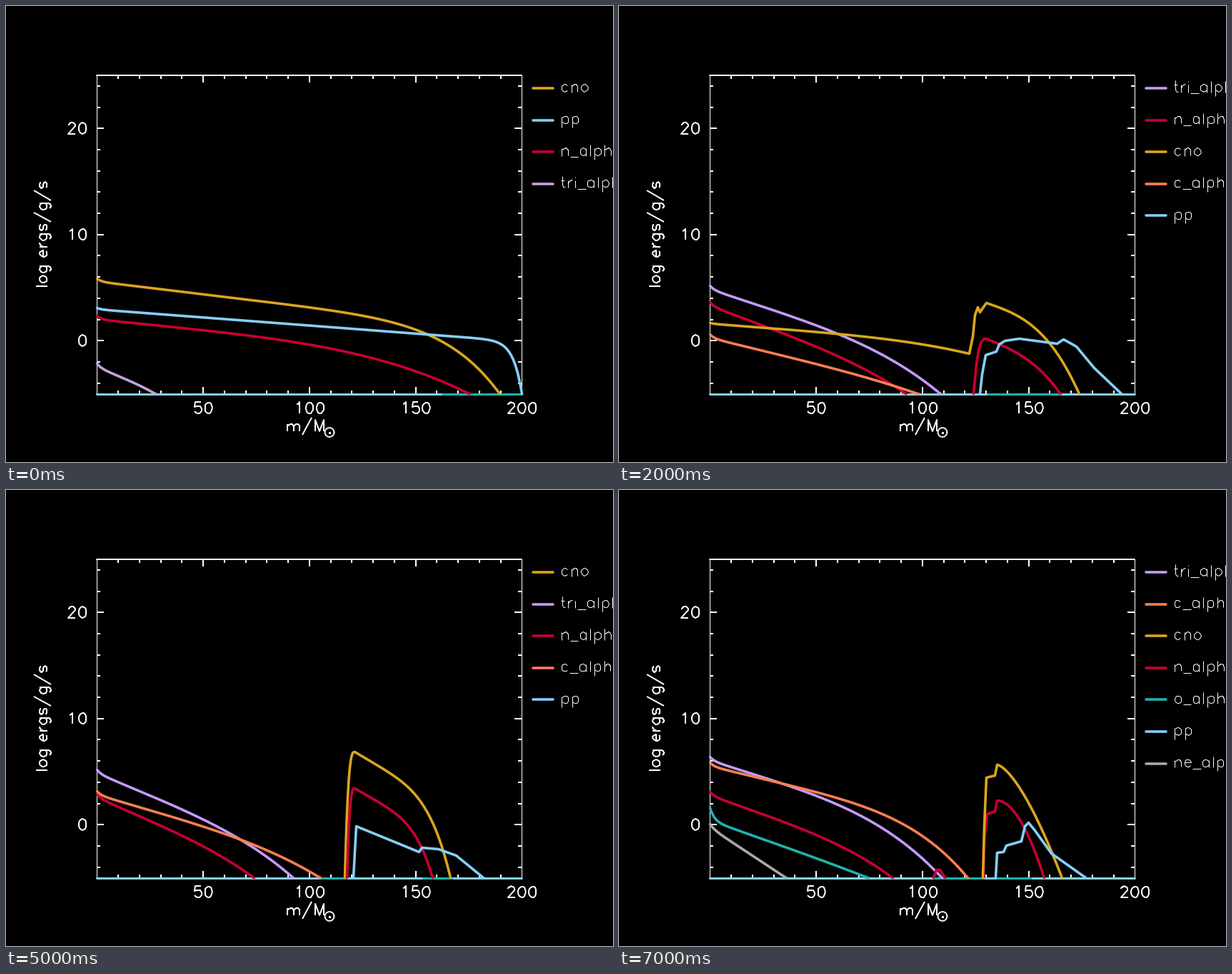
Write a matplotlib script that moves like this. It is 850 by 638 pixels and loops after 8000 ms.

```python
import numpy as np
import matplotlib.pyplot as plt
from matplotlib.animation import ArtistAnimation
from matplotlib.collections import LineCollection

W, H, DPI = 850, 638, 100
PX = 72 / DPI
LEFT, RIGHT, TOP, FLOOR = 127.5, 722.5, 97, 542.5
UNIT = 0.74  # pixels per glyph unit

COLORS = dict(cno="#DAA520", pp="#87CEFA", n="#C80032", tri="#C49AFF",
              c="#FF7F50", ne="#A9A9A9", o="#20B2AA")
LABELS = dict(cno="cno", pp="pp", n="n_alpha", tri="tri_alpha",
              c="c_alpha", ne="ne_alpha", o="o_alpha")

plt.rcParams["toolbar"] = "None"
fig = plt.figure(figsize=(W / DPI, H / DPI), dpi=DPI, facecolor="black")
ax = fig.add_axes([0, 0, 1, 1])
ax.set(xlim=(0, W), ylim=(H, 0))
ax.axis("off")


# --- stroke lettering, y up from the baseline ---

def arc(cx, cy, rx, ry, a0, a1):
    a = np.radians(np.linspace(a0, a1, 16))
    return list(zip(cx + rx * np.cos(a), cy + ry * np.sin(a)))


def stem(x, top, bottom=0):
    return [(x, top), (x, bottom)]


def arch(x):
    return [(x, 10)] + arc(x + 6.5, 9, 4.5, 5, 150, 0) + [(x + 11, 0)]


BOWL = arc(9, 7, 6, 7, 40, 320)

GLYPHS = {  # character: (advance, strokes)
    " ": (11, []),
    "_": (16, [[(0, -2), (16, -2)]]),
    "/": (22, [[(20, 25), (2, -7)]]),
    "a": (19, [[(15, 10)] + BOWL + [(15, 3)], stem(15, 14)]),
    "c": (18, [BOWL]),
    "e": (18, [[(3, 8), (15, 8)] + arc(9, 7, 6, 7, 10, 320)]),
    "g": (19, [[(15, 10)] + BOWL + [(15, 3)],
               stem(15, 14) + arc(10, -2, 5, 5, 0, -145)]),
    "h": (19, [stem(4, 21), arch(4)]),
    "i": (8, [stem(4, 14), stem(4, 21, 20)]),
    "l": (8, [stem(4, 21)]),
    "m": (30, [stem(4, 14), arch(4), arch(15)]),
    "n": (19, [stem(4, 14), arch(4)]),
    "o": (19, [arc(9.5, 7, 6.5, 7, 0, 360)]),
    "p": (19, [stem(4, 14, -7), arc(10, 7, 6, 7, 145, -145)]),
    "r": (13, [stem(4, 14), arc(12, 6, 8, 8, 165, 90)]),
    "s": (17, [arc(8.5, 10.5, 5.5, 3.5, 20, 270)
               + arc(8.5, 3.5, 5.5, 3.5, 90, -160)]),
    "t": (12, [[(5, 21), (5, 4), (6, 1), (8, 0), (10, 0)], [(2, 14), (9, 14)]]),
    "M": (24, [[(4, 0), (4, 21), (12, 0), (20, 21), (20, 0)]]),
    "0": (20, [arc(10, 10.5, 7, 10.5, 0, 360)]),
    "1": (20, [[(6, 17), (8, 18), (11, 21), (11, 0)]]),
    "2": (20, [arc(10, 15.5, 6, 5.5, 175, -25) + [(3, 0), (17, 0)]]),
    "5": (20, [[(15, 21), (5, 21), (4, 12)] + arc(10, 7, 7, 7, 110, -155)]),
}


def text_width(s):
    return UNIT * sum(GLYPHS[ch][0] for ch in s)


def write(s, x, y, width, upward=False):
    """Draw strokes on the pixel grid, so that stems stay crisp."""
    strokes, pen = [], 0
    for ch in s:
        advance, parts = GLYPHS[ch]
        for part in parts:
            p = np.array(part, float)
            u, v = UNIT * (p[:, 0] + pen), UNIT * p[:, 1]
            spot = np.c_[x - v, y - u] if upward else np.c_[x + u, y - v]
            strokes.append(np.round(spot) + width % 2 / 2)
        pen += advance
    return ax.add_collection(LineCollection(
        strokes, colors="white", linewidths=width * PX))


def line(xs, ys, color, width, z=2, cap="round"):
    return ax.plot(xs, ys, color=color, lw=width * PX, zorder=z,
                   solid_capstyle=cap, solid_joinstyle="round")[0]


# --- fixed axes ---

def x_at(mass):
    return LEFT + mass * (RIGHT - LEFT) / 200


def y_at(value):
    return TOP + (25 - value) * (FLOOR - TOP) / 30


def tick(xs, ys):
    line(xs, ys, "white", 2, 1, "butt")


def draw_axes():
    for x in (LEFT, RIGHT):
        line([x, x], [TOP, FLOOR], "white", 1, 1)
    for y in (TOP, FLOOR):
        line([LEFT, RIGHT], [y, y], "white", 2, 1)
    for m in range(10, 200, 10):
        x, size = x_at(m), 10 if m % 50 == 0 else 5
        tick([x, x], [TOP, TOP + size])
        tick([x, x], [FLOOR, FLOOR - size])
    for v in range(-4, 25, 2):
        y, size = y_at(v), 10 if v % 10 == 0 else 5
        tick([LEFT, LEFT + size], [y, y])
        tick([RIGHT, RIGHT - size], [y, y])
    for m in (50, 100, 150, 200):
        write(str(m), x_at(m) - text_width(str(m)) / 2, 570, 2)
    for v in (0, 10, 20):
        write(str(v), 114.5 - text_width(str(v)), y_at(v) + 7.5, 2)
    write("m/M", 391.5, 595, 2)
    sun = np.array(arc(453, 596.5, 6.5, 6.5, 0, 360))
    line(sun[:, 0], sun[:, 1], "white", 1.8)
    ax.plot([453], [596.5], "o", color="white", ms=3.4 * PX, mew=0)
    s = "log ergs/g/s"
    write(s, 57.5, 319.7 + text_width(s) / 2, 2, upward=True)


# --- curve pieces, in stage pixels ---

def fall(x0, y0, x1, bend, power=3, cusp=0, y1=FLOOR):
    """Drop from start to end: quick cusp, steady slope, bend at the end."""
    x = np.linspace(x0, x1, 200)
    u = (x - x0) / (x1 - x0)
    dip = cusp * (1 - np.exp(-(x - x0) / 6))
    slope = (1 - bend) * u + bend * u ** power
    return np.c_[x, y0 + dip + (y1 - y0 - cusp) * slope]


def rise(x0, x1, y1, power=3):
    """Leave the floor steeply and level off at the peak."""
    u = np.linspace(0, 1, 60)
    return np.c_[x0 + (x1 - x0) * u, y1 + (FLOOR - y1) * (1 - u) ** power]


scenes = []


class Scene:
    """One still: legend in the given order, floor line and curves."""

    def __init__(self, order, *teal, **tint):
        self.colors = {**COLORS, **tint}
        self.art = [line([LEFT, RIGHT], [FLOOR, FLOOR], COLORS["pp"], 3)]
        self.art += [line(span, [FLOOR, FLOOR], COLORS["o"], 3, cap="butt")
                     for span in teal]
        for i, key in enumerate(order.split()):
            y = 115 + 44.6 * i
            self.art.append(line([738, 766], [y, y], self.colors[key], 3.6))
            self.art.append(write(LABELS[key], 775.5, y + 4.6, 1))
        scenes.append(self.art)

    def curve(self, key, *pieces):
        x, y = np.vstack(pieces).T
        z = 4 if key == "pp" else 3
        self.art.append(line(x + 0.5, np.minimum(y + 0.5, FLOOR),
                             self.colors[key], 3.6, z))

    def core(self, key, y0, x1, bend, power=4, cusp=5):
        self.curve(key, fall(127, y0, x1, bend, power, cusp))

    def shell(self, key, x0, peak, x1, bend, power=3):
        self.curve(key, rise(x0, *peak), fall(*peak, x1, bend, power))


draw_axes()

s = Scene("cno pp n tri", (610, 722), tri="#C8A2DC")
s.core("tri", 500, 209, 0.1)
s.core("n", 433, 649, 0.5)
s.core("cno", 381, 691, 0.57, 8, 4)
s.core("pp", 422, 722, 0.62, 50, 2)

s = Scene("cno n pp tri", (600, 715))
s.core("tri", 470, 296, 0.1)
s.core("n", 413, 640, 0.45)
s.core("cno", 372, 682, 0.57, 8, 4)
s.core("pp", 430, 716, 0.62, 30, 2)

s = Scene("tri n cno c pp", (515, 618))
s.core("tri", 391, 450, 0.28)
s.core("n", 414, 402, 0.17)
s.core("c", 459, 419, 0.1)
s.shell("n", 496, (514, 465), 618, 0.45)
s.curve("cno", fall(127, 443, 490, 0.35, 4, 1, 486),
        [(495, 462), (498, 432), (502, 421), (505, 428)],
        fall(514, 415, 644, 0.65))
s.curve("pp", [(505, 542), (508, 515), (513, 488), (528, 483), (532, 473)],
        [(540, 468), (560, 465), (613, 472), (622, 466), (640, 476)],
        [(665, 506), (703, 542)])

s = Scene("cno tri n c pp ne o", (590, 632))
s.core("ne", 500, 185, 0.1)
s.core("o", 511, 196, 0.1)
s.core("tri", 377, 474, 0.35)
s.curve("cno", rise(192, 350, 504, 2.5),
        [(428, 508), (445, 504), (490, 508), (493, 480), (496, 476)],
        [(500, 445), (503, 405), (505, 331), (507, 333), (508, 349)],
        fall(508, 349, 569, 0.2, y1=376), fall(570, 435, 644, 0.55))
s.core("n", 404, 425, 0.25)
s.curve("n", [(503, 542), (505, 395)], fall(507, 403, 569, 0.2, y1=432),
        fall(570, 487, 621, 0.45))
s.core("c", 411, 508, 0.33)
s.curve("pp", [(505, 542), (506, 475), (507, 460), (568, 479), (570, 465)],
        [(605, 468), (627, 479), (637, 471), (655, 495), (701, 542)])

s = Scene("cno n tri c pp", (395, 440), (583, 640))
s.core("tri", 411, 390, 0.14)
s.core("n", 427, 350, 0.12)
s.core("c", 438, 440, 0.16)
s.curve("cno", [(417, 537), (418, 542)])
s.curve("cno", [(432, 541), (441, 512), (452, 504), (457, 487), (465, 482)],
        [(468, 464), (479, 449), (483, 420), (485, 380)],
        fall(488, 355, 606, 0.65, 12, y1=498), [(614, 507), (632, 542)])
s.shell("n", 477, (487, 406), 606, 0.65, 10)
s.curve("pp", [(487, 542), (488, 466), (579, 493), (581, 480), (587, 484)],
        [(592, 481), (608, 485), (625, 494), (638, 491), (660, 511)],
        [(694, 542)])

s = Scene("cno tri n c pp", (440, 478), (583, 625))
s.core("tri", 391, 402, 0.22)
s.core("n", 425, 347, 0.15)
s.core("c", 421, 440, 0.22)
s.shell("cno", 474, (488, 366), 622, 0.55, 5)
s.shell("n", 477, (488, 417), 597, 0.5, 5)
s.curve("pp", [(486, 542), (490, 470), (578, 506), (582, 500), (605, 502)],
        [(630, 511), (668, 542)])

s = Scene("tri cno c n pp ne o", (440, 478), (488, 495), (613, 625))
s.core("ne", 484, 193, 0.05)
s.core("o", 499, 213, 0.05)
s.core("tri", 373, 413, 0.36)
s.core("n", 424, 345, 0.22)
s.core("c", 404, 441, 0.34)
s.shell("cno", 477, (489, 376), 613, 0.36)
s.shell("n", 478, (489, 427), 588, 0.27)
s.curve("pp", rise(484, 490, 474, 2),
        [(500, 481), (520, 493), (578, 520), (597, 518), (617, 526)],
        [(625, 532), (629, 529), (643, 542)])

s = Scene("tri c cno n o pp ne", (440, 510), (528, 578))
s.core("ne", 467, 234, 0)
s.core("o", 444, 349, 0.03, cusp=18)
s.core("tri", 373, 452, 0.38)
s.core("c", 381, 488, 0.45, 5)
s.core("n", 422, 383, 0.22)
s.curve("n", [(440, 542), (444, 531), (449, 531), (456, 542)])
s.curve("n", [(510, 542), (511, 490), (515, 453), (526, 449)],
        fall(529, 434, 595, 1, 1.9))
s.curve("cno", [(509, 542), (511, 470), (514, 402), (526, 399)],
        fall(529, 384, 620, 1, 1.5))
s.curve("pp", [(527, 542), (529, 507), (538, 506), (542, 497), (563, 491)],
        [(568, 470), (573, 465), (582, 476), (605, 508), (653, 542)])

anim = ArtistAnimation(fig, scenes, interval=1000, repeat=True, repeat_delay=0)
plt.show()
```
